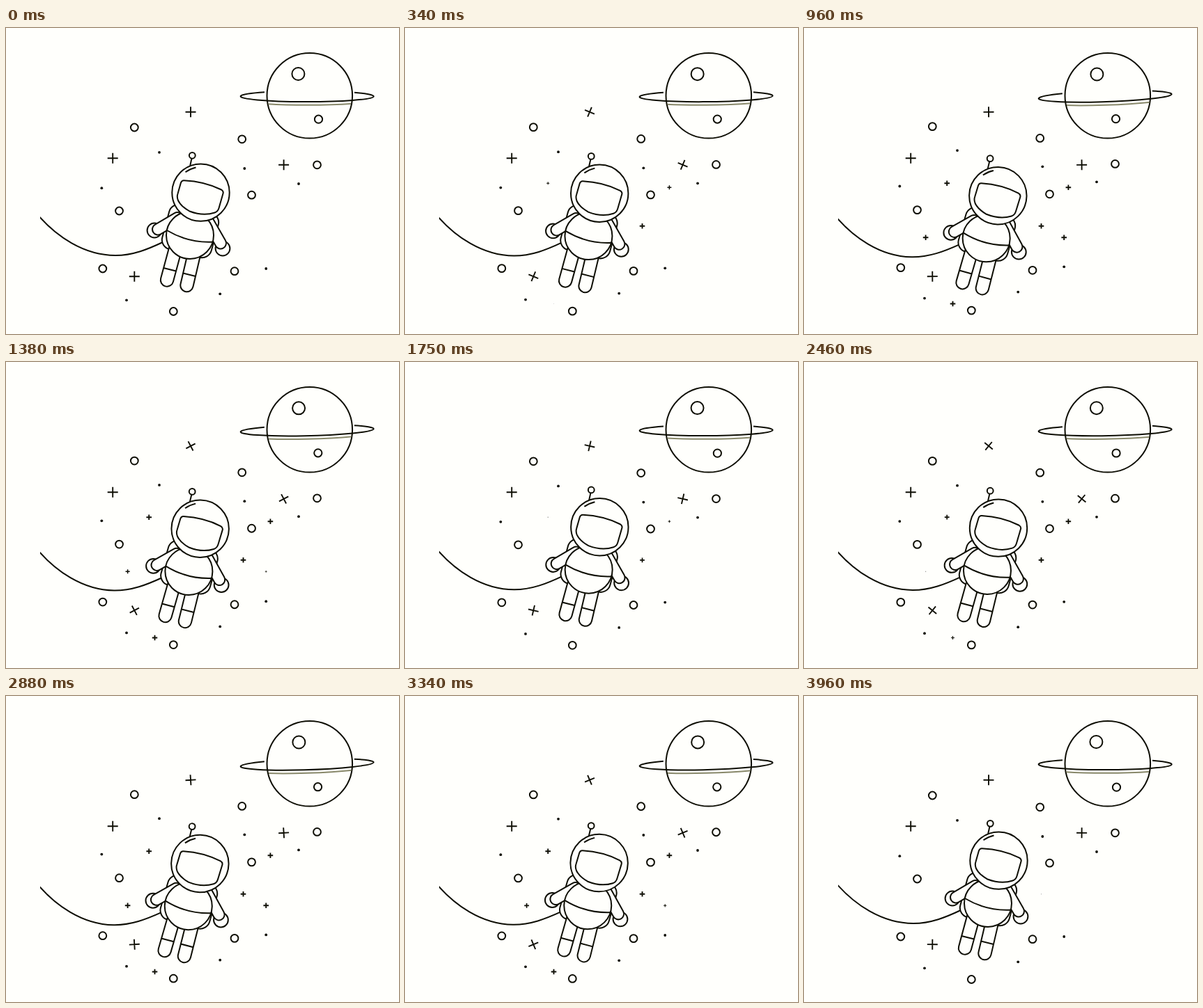
Animation of 564x440 px, one loop 4 s. Source, as an HTML page:

```html
<!DOCTYPE html>
<html lang="en">
<head>
<meta charset="utf-8">
<title>Floating astronaut</title>
<style>
html, body { margin: 0; width: 100%; height: 100%; overflow: hidden; background: #fffffc; }
svg { display: block; width: 564px; height: 440px; fill: none; stroke: #0e0e04; stroke-width: 2; }
.solid { fill: #fffffc; }
.dot { fill: #0e0e04; stroke: none; }
.plus { stroke-width: 1.9; }
</style>
</head>
<body>
<svg viewBox="0 0 564 440">
  <defs>
    <clipPath id="stage"><rect x="49" y="0" width="515" height="440"/></clipPath>
    <clipPath id="globe"><circle cx="435.8" cy="97.3" r="60.5"/></clipPath>
  </defs>

  <g id="planet">
    <circle cx="435.8" cy="97.3" r="61.3"/>
    <circle id="crater1" cx="419.4" cy="66" r="9"/>
    <circle id="crater2" cx="448.5" cy="131.2" r="5.6"/>
    <g clip-path="url(#globe)">
      <path id="shade" d="M337 103A95.5 7.8 0 0 0 528 103" stroke="#88886a"/>
    </g>
    <path id="ring" d="M371 92.3A95.5 7.8 0 1 0 500 92.8"/>
  </g>

  <g id="sky"></g>

  <g clip-path="url(#stage)">
    <g id="astronaut">
      <path d="M42 264.5C72 301 113 327 157 327C182 327 204 318 226 307.5"/>
      <rect class="solid" x="228" y="259" width="73" height="66" rx="14" transform="rotate(15 264.5 292)"/>
      <g id="limbs"></g>
      <circle class="solid" cx="264" cy="298" r="34"/>
      <path d="M231 291Q262 309.5 297.5 307.5"/>
      <path d="M266.5 187.5L264.2 198"/>
      <circle class="solid" cx="267.3" cy="183.3" r="4.4"/>
      <circle class="solid" cx="279.5" cy="236.6" r="41.2"/>
      <path d="M257.5 207.3Q264 202.5 272.5 200.5"/>
      <path d="M255.5 219.2Q285 220.5 309 232.5Q312.5 234.5 311.5 238L305.5 259Q304 264 299.5 265.5Q283 271 263.5 263.5Q251 256.5 247 248Q245 243 246.3 239L250.8 223Q252 219 255.5 219.2Z"/>
    </g>
  </g>
</svg>
<script>
const $ = id => document.getElementById(id);

function add(parent, tag, attrs) {
  const el = document.createElementNS('http://www.w3.org/2000/svg', tag);
  for (const k in attrs) el.setAttribute(k, attrs[k]);
  return $(parent).appendChild(el);
}
function place(el, transform) { el.setAttribute('transform', transform); }

// An outlined capsule: a dark round-capped line under a lighter one.
function limb(d, r) {
  add('limbs', 'path', { d, 'stroke-width': 2 * r + 2, 'stroke-linecap': 'round' });
  add('limbs', 'path', { d, 'stroke-width': 2 * r - 2, 'stroke-linecap': 'round', stroke: '#fffffc' });
}
function glove(cx, cy) { add('limbs', 'circle', { cx, cy, r: 10.4, class: 'solid' }); }
function plus(r) {
  return add('sky', 'path', { d: `M${-r} 0H${r}M0 ${-r}V${r}`, class: 'plus' });
}

limb('M243 318L231 362.5', 9.2);
limb('M270 325L259.5 370', 9.2);
add('limbs', 'path', { d: 'M226 345L244 349.5M253.8 352.5L272 357' });
glove(213, 291);
limb('M246 273L218 289.5', 8);
glove(311, 317);
limb('M290 278L308 309.5', 8);

const circles = [[184.3, 143], [338.7, 159.8], [446.5, 196.8], [352.5, 240.2],
  [162.5, 263], [138.8, 346], [328, 349.7], [240.3, 407.5]]
  .map(([cx, cy]) => add('sky', 'circle', { cx, cy, r: 5.4 }));

const dots = [[220, 178.8], [137.3, 230.2], [342.3, 202], [420, 224],
  [373.2, 346], [173, 391.3], [307.2, 382.3]]
  .map(([cx, cy]) => add('sky', 'circle', { cx, cy, r: 1.9, class: 'dot' }));

const spinners = [[265, 120.8], [398.6, 196.8], [184.3, 357.2]]
  .map(p => ({ p, el: plus(7.5) }));
place(plus(7.5), 'translate(153.2 187.2)');

// x, y, moment of appearing in seconds
const twinkles = [[340.5, 284.8, .02], [379.4, 229.2, .15], [205.2, 223.2, .22],
  [213.5, 396.5, .32], [174.6, 301.3, .43], [373.2, 301.3, .55]]
  .map(([x, y, at]) => ({ x, y, at, el: plus(3.8) }));

function draw(ms) {
  const step = Math.floor((ms % 4000 + 5) * 24 / 1000);
  const phase = step / 24 % 2;
  const t = phase > 1 ? 2 - phase : phase;
  const e = (1 - Math.cos(Math.PI * t)) / 2;

  place($('astronaut'), `rotate(${1.07 * e} 32 175)`);
  place($('ring'), `rotate(${-1.9 * e} 432.5 98.3)`);
  place($('shade'), `rotate(${-1.9 * e} 432.5 103)`);
  place($('crater1'), `translate(${e} ${.5 * e})`);
  place($('crater2'), `translate(${-e} ${-.5 * e})`);
  circles.forEach(c => place(c, `translate(0 ${-1.4 * e})`));
  dots.forEach(d => place(d, `translate(0 ${-2.7 * e})`));
  spinners.forEach(s => place(s.el, `translate(${s.p}) rotate(${90 * e})`));
  twinkles.forEach(({ x, y, at, el }) => {
    const k = Math.min(1, Math.max(0, (t - at) / .35));
    const size = 1 - (1 - k) ** 2;
    el.style.display = size ? '' : 'none';
    place(el, `translate(${x} ${y}) scale(${size})`);
  });
}

const start = performance.now();
function tick() {
  draw(performance.now() - start);
  requestAnimationFrame(tick);
}
tick();
</script>
</body>
</html>
```
